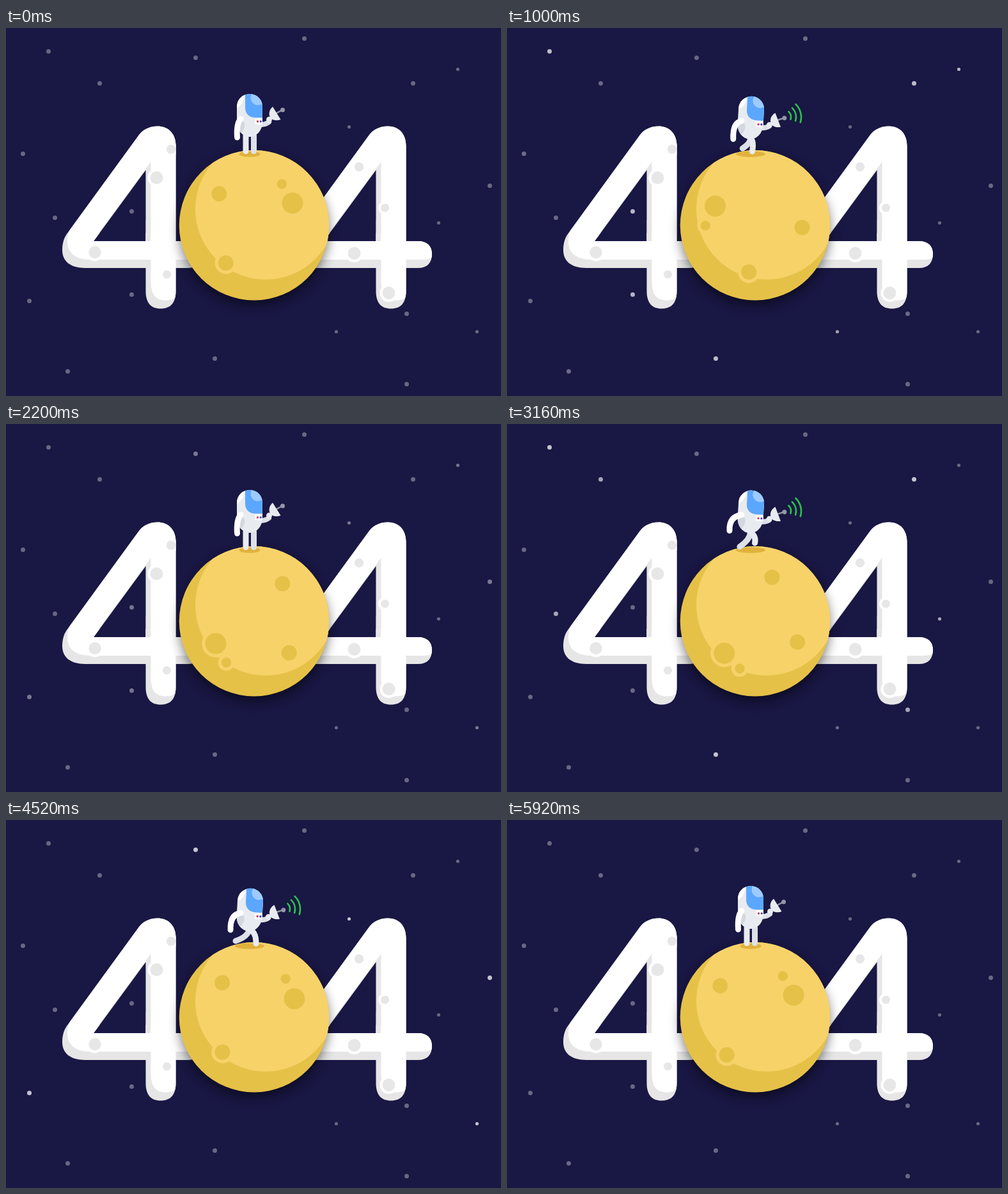
Write an HTML page that moves like this. It is 774x575 px and loops after 5960 ms.

```html
<!DOCTYPE html>
<html lang="en">
<head>
<meta charset="utf-8">
<title>404</title>
<style>
  html, body { margin: 0; width: 100%; height: 100%; overflow: hidden; background: #191743; }
  svg { display: block; width: 774px; height: 575px; }
  .limb { fill: none; stroke-linecap: round; }
</style>
</head>
<body>
<svg viewBox="0 0 774 575" xmlns="http://www.w3.org/2000/svg">
  <defs>
    <path id="four" clip-rule="evenodd" fill-rule="evenodd" d="M237 153.5C255 153.5 265.5 166 265.5 184V333H284C299 333 306 341 306 353C306 367 299 375 284 375H265.5V411C265.5 430 257 438.5 242 438.5C227 438.5 218.5 430 218.5 411V375H124C100 375 88 364 88 347C88 338 90 329 95 322L208 167C215 158 225 153.5 237 153.5ZM218.5 222L137 333H218.5Z"/>
    <clipPath id="fourClip"><use href="#four"/></clipPath>
    <clipPath id="bothClip"><use href="#four"/><use href="#four" x="360"/></clipPath>
    <g id="digit">
      <use href="#four" fill="#e6e6e6"/>
      <g clip-path="url(#fourClip)">
        <use href="#four" fill="#fff" transform="translate(8 -13)"/>
        <path d="M218.5 300H226V333H218.5ZM265.5 362H274V375H265.5Z" fill="#e6e6e6"/>
      </g>
    </g>
    <clipPath id="moonClip"><circle cx="388" cy="308.3" r="117.2"/></clipPath>
    <path id="suit" d="M361 123a20 20 0 0 1 40 0V146C401 160 392 170 381 170C370 170 361 160 361 146Z"/>
    <clipPath id="suitClip"><use href="#suit"/></clipPath>
    <filter id="soft" x="-30%" y="-30%" width="160%" height="160%"><feGaussianBlur stdDeviation="9"/></filter>
  </defs>

  <rect width="774" height="575" fill="#191743"/>
  <g id="stars" fill="#fff"></g>
  <use href="#digit"/>
  <use href="#digit" x="360"/>
  <g id="pits" clip-path="url(#bothClip)"></g>

  <g id="moon">
    <circle cx="388" cy="316" r="117" opacity=".5" filter="url(#soft)"/>
    <circle cx="388" cy="308.3" r="117.2" fill="#e6c148"/>
    <circle cx="406" cy="283" r="110" fill="#f6d269" clip-path="url(#moonClip)"/>
    <g id="craters"></g>
    <ellipse id="shade" cx="381" cy="197" ry="4.5" fill="#e0b23c"/>
  </g>

  <g id="walker">
    <path id="legB" class="limb" stroke="#dde1e7" stroke-width="9"/>
    <path id="legA" class="limb" stroke="#e8ebf0" stroke-width="9"/>
    <g id="upper">
      <path id="armR" class="limb" stroke="#dde1e7" stroke-width="8"/>
      <g id="dish">
        <path class="limb" d="M423 133L432 128" stroke="#9497a6" stroke-width="2.5"/>
        <circle cx="432.5" cy="128" r="3.5" fill="#9497a6"/>
        <path d="M417 123C411 128 410 136 414 141C418 145 424 145 429.5 143Z" fill="#e8ebf0"/>
        <circle cx="411.5" cy="143" r="4.5" fill="#e8ebf0"/>
      </g>
      <g id="body">
        <use href="#suit" fill="#e8ebf0"/>
        <g clip-path="url(#suitClip)">
          <path d="M364 144C376 143 376 156 366 166L360 160Z" fill="#d3d8df"/>
          <path d="M360 103H374C372 110 370 122 360 125Z" fill="#fff"/>
          <path d="M374 100H402V140H390C380 140 374 134 374 124Z" fill="#5ba7ff"/>
          <circle cx="394" cy="109" r="11.5" fill="#9dcaff"/>
        </g>
        <rect x="389" y="141.5" width="12" height="9" rx="3" fill="#fff"/>
        <circle cx="393.5" cy="146" r="1.7" fill="#e0364c"/>
        <circle cx="398.2" cy="146" r="1.7" fill="#3a56c9"/>
      </g>
      <path id="armL" class="limb" stroke="#fff" stroke-width="9"/>
      <path id="signal" class="limb" stroke="#2bc44d" stroke-width="2.6"/>
    </g>
  </g>
</svg>

<script>
const LOOP = 5960, HALF = LOOP / 2, STEP = 320, TAU = 2 * Math.PI;
const $ = id => document.getElementById(id);
const set = (el, attrs) => { for (const k in attrs) el.setAttribute(k, attrs[k]); };
const smooth = v => { v = Math.max(0, Math.min(1, v)); return v * v * (3 - 2 * v); };
const mix = (a, b, w) => a + (b - a) * w;
const mixAll = (a, b, w) => a.map((v, i) => mix(v, b[i], w));
const curve = p => `M${p[0]} ${p[1]}Q${p[2]} ${p[3]} ${p[4]} ${p[5]}`;
const polar = (x, y, r, deg) => [x + r * Math.cos(deg * TAU / 360), y + r * Math.sin(deg * TAU / 360)];

function dot(parent, cx, cy, r, fill) {
  const c = document.createElementNS('http://www.w3.org/2000/svg', 'circle');
  set(c, { cx, cy, r, ...(fill && { fill }) });
  parent.append(c);
  return c;
}

// each pair of twinkle times is shared by a group of stars
const sky = [
  { peaks: [1060, 3160], spots: [[66, 36], [636, 86], [326, 516]] },
  { peaks: [920, 2430], spots: [[196, 286], [196, 416], [706, 64]] },
  { peaks: [1130, 4050], spots: [[516, 474]] },
  { peaks: [400, 3280], spots: [[76, 296], [146, 86], [626, 446], [676, 304]] },
  { peaks: [2420, 4500], spots: [[296, 46], [756, 246], [36, 426], [536, 154], [736, 474]] },
  { peaks: [1260, 5430], spots: [[466, 16], [26, 196], [96, 536]] },
  { peaks: [600, 4220], spots: [[626, 556]] }
];
// stars on the lines ending in 4 are the small ones
for (const group of sky)
  group.dots = group.spots.map(([x, y]) => dot($('stars'), x + .5, y + .5, y % 10 === 4 ? 2.6 : 3.5));

function pits(parent, list, rim, rimFill, fill) {
  for (const [x, y, r] of list) dot(parent, x, y, r + rim, rimFill);
  for (const [x, y, r] of list) dot(parent, x, y, r, fill);
}
pits($('pits'), [[258, 189.5, 7.2], [235.5, 234, 10], [139, 350.5, 9.7], [251.5, 385, 6.5],
  [552, 217, 7.2], [592.5, 281, 6.5], [544.5, 352, 10], [598.5, 414, 10]], 4, '#fff', '#e7e7e7');

// angle and size; larger craters lie closer to the centre
const craters = [[222, 12], [127, 12], [304, 7.7], [330, 16.5]]
  .map(([deg, r]) => [...polar(388, 308.3, 85 - .95 * r, deg), r]);
pits($('craters'), craters, 5.2, '#f6d269', '#e6c148');

const signal = [12, 20, 28].map(r =>
  `M${polar(432, 135.5, r, -46)}A${r} ${r} 0 0 1 ${polar(432, 135.5, r, 17)}`);
set($('signal'), { d: signal.join('') });

// half a turn, quick at first and slowing to a stop
function turned(u) {
  const s = Math.min(u / 1800, 1);
  return 180 * (1 - (1 - s) ** (.75 + 1.25 * s));
}

// hip, knee and foot of a walking leg; p runs 0..1 on the ground, 1..2 in the air
function stride(p, bob) {
  const hip = [380.5, 168 + bob];
  if (p < 1) return [...hip, 391 - 14 * p, 174 + 9 * p, 391 - 32 * smooth(p), 193 - 4 * p ** 4];
  const q = p - 1, s = Math.sin(Math.PI * q);
  return [...hip, 377 + 14 * q * q + 10 * s * q, 183 - 9 * q,
    359 + 32 * smooth(q) + 2 * s, 189 + 4 * q ** 3 - 12 * s * q * q];
}

const standing = x => [x, 168, x, 180, x, 192.5];

function draw(t) {
  for (const { peaks, dots } of sky) {
    const glow = Math.max(0, ...peaks.map(p => 1 - Math.abs(t - p) / 300));
    const opacity = .35 + .4 * Math.sin(glow * TAU / 4) ** 2;
    for (const el of dots) set(el, { opacity });
  }

  const u = t % HALF;
  const angle = -turned(u) - (t >= HALF ? 180 : 0);
  const w = smooth((u - 20) / 120) * (1 - smooth((u - 1600) / 220));
  const steps = (u - 900) / STEP + 10;
  const swing = lag => Math.cos(TAU * (steps - lag));

  const lift = -3 * w * Math.sin(Math.PI * (u - 180) / 272) ** 2;
  const bob = w * (2.5 + 2.3 * swing(.16));
  for (const id of ['moon', 'walker']) set($(id), { transform: `translate(0 ${lift})` });
  set($('craters'), { transform: `rotate(${angle} 388 308.3)` });
  set($('shade'), { rx: mix(16.5, 23, w) });

  set($('legA'), { d: curve(mixAll(standing(375), stride(steps % 2, bob), w)) });
  set($('legB'), { d: curve(mixAll(standing(387.5), stride((steps + 1) % 2, bob), w)) });

  set($('upper'), { transform: `translate(0 ${bob})` });
  set($('body'), { transform: `rotate(${3.5 * w} 381 140)` });
  set($('dish'), { transform: `translate(${.5 * w} ${7 * w}) rotate(${11 * w} 423 133)` });
  set($('armR'), { d: curve(mixAll([398, 151, 406, 151, 411, 147], [397, 152, 405, 153, 410, 149.5], w)) });
  const sway = 3 * swing(.25);
  set($('armL'), { d: curve(mixAll([367, 142, 360, 149, 361.5, 171],
    [367, 141.5, 350 + sway, 144, 351 + sway, 168 + .6 * sway], w)) });
  set($('signal'), { opacity: w });
}

function frame() {
  draw(performance.now() % LOOP);
  requestAnimationFrame(frame);
}
frame();
</script>
</body>
</html>
```
